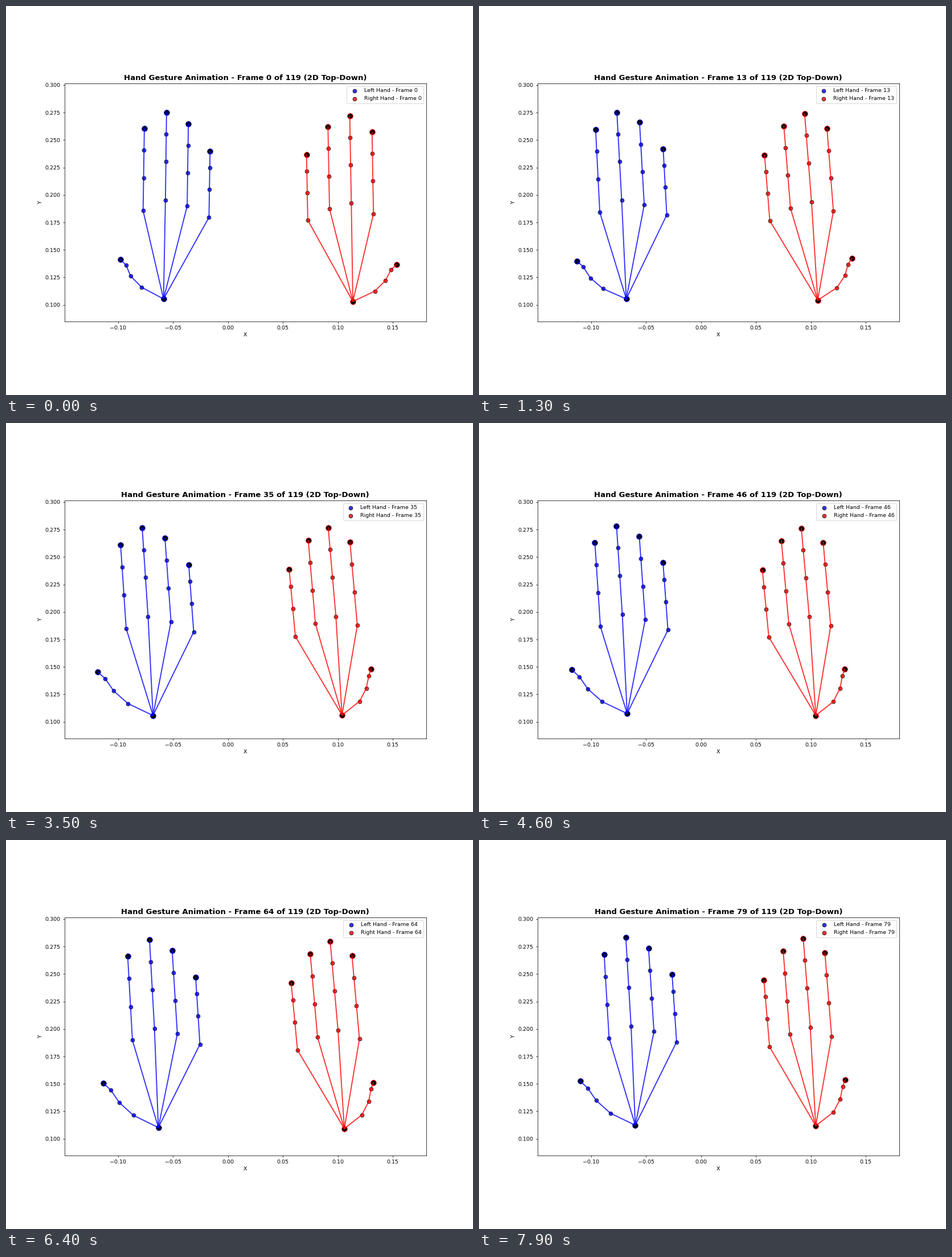
Write a matplotlib script that moves like this. It is 820 px wide and 683 px high and loops after 8000 ms.

```python
import numpy as np
import matplotlib.pyplot as plt
from matplotlib.animation import FuncAnimation

DPI = 68.3
FRAMES, TOTAL = 80, 119
UNIT = 1928.5  # stage pixels per data unit

# Spread of the two middle joints along each finger, index to little finger
JOINTS = ((0.40, 0.735), (0.44, 0.753), (0.40, 0.735), (0.418, 0.749))

# Each pose: wrist, four thumb joints, then knuckle and tip of every finger
LEFT_POSES = [
    [(276.5, 514.5), (238, 494), (218.8, 474.5), (210.6, 455), (200.5, 445),
     (240.6, 359.5), (242.8, 215), (279.8, 341.2), (281.8, 187),
     (318, 351.3), (320.1, 206.7), (356.3, 371.2), (358.2, 255)],
    [(258.5, 514.5), (217.6, 496.6), (195.6, 477.8), (182.6, 457.8), (172.3, 448.4),
     (212, 362.3), (204.6, 216.7), (250.4, 341.2), (242, 186.8),
     (290, 349.2), (281.8, 204.6), (329.6, 367), (323.3, 251)],
    [(255, 515.3), (210.7, 494.9), (185.4, 473), (170.3, 451.8), (156.6, 439.5),
     (206, 363), (194.4, 216.1), (244.2, 341.7), (232, 186.1),
     (284.6, 350), (272.2, 203.9), (324.7, 367.7), (314.5, 249.7)],
]
RIGHT_POSES = [
    [(609, 519), (647.5, 500.9), (665.9, 482.5), (676, 463.4), (685.5, 454.4),
     (645.2, 365), (642.7, 221.6), (606.3, 346.5), (603.5, 192.9),
     (568, 356.1), (565.3, 212.6), (529.8, 376), (527.7, 261.2)],
    [(594.7, 516.7), (628.2, 494.9), (642.5, 473.6), (648, 453.8), (655, 442.9),
     (622.2, 360), (611, 215.4), (583.8, 343.8), (571.7, 189.4),
     (546.9, 355.4), (535.2, 210.8), (510.6, 377.2), (501.3, 261.7)],
    [(587.2, 517), (618, 492.6), (629.6, 469.5), (633.8, 447.5), (637.8, 435.5),
     (613.2, 359.4), (599.6, 213), (575.5, 343.8), (561.2, 188.1),
     (539.6, 356.7), (526.3, 210.7), (504.5, 379.4), (493, 261.9)],
]

# Rigid drift after the last pose: time step, wrist x, wrist y, turn in degrees
LEFT_DRIFT = [(24, 255, 515.3, 0), (35, 258, 513.7, 0.7), (46, 260, 510.3, 0.76),
              (64, 267.4, 505, 1.3), (79, 274.3, 501, 1.12)]
RIGHT_DRIFT = [(24, 587.2, 517, 0), (35, 590, 513, 0.3), (40, 591, 515, 0.2),
               (46, 591.3, 513.7, 0.1), (54, 593, 508.5, 0.15),
               (64, 594, 507, 0.2), (79, 591.2, 502, 0.7)]


def phase(i):
    """Position between the poses: slow start, quick middle, soft stop."""
    return np.interp(i, (0, 5, 9, 13, 18, 20, 24), (0, 0.18, 0.5, 1, 1.81, 1.93, 2))


class Hand:
    def __init__(self, ax, name, color, poses, drift):
        self.name = name
        self.poses = np.array(poses) @ (1, 1j)
        self.drift = np.array(drift).T
        self.dots = ax.scatter([], [], s=50, c=color, alpha=0.8,
                               edgecolors="black", linewidths=1, label=name)
        self.ends = ax.scatter([], [], s=100, c="black", edgecolors=color,
                               linewidths=1)
        self.lines = [ax.plot([], [], color=color, lw=2, alpha=0.8)[0]
                      for _ in range(5)]

    def points(self, i):
        p = phase(i)
        k = min(int(p), 1)
        pts = self.poses[k] + (p - k) * (self.poses[k + 1] - self.poses[k])
        t, x, y, turn = self.drift
        if i > t[0]:
            spin = np.exp(1j * np.radians(np.interp(i, t, turn)))
            wrist = np.interp(i, t, x) + 1j * np.interp(i, t, y)
            pts = wrist + (pts - pts[0]) * spin
        return (pts.real - 389.7) / UNIT + 1j * (0.1 + (524.8 - pts.imag) / UNIT)

    def update(self, i):
        pts = self.points(i)
        wrist = pts[0]
        chains = [list(pts[1:5])]
        for (a, b), knuckle, tip in zip(JOINTS, pts[5::2], pts[6::2]):
            chains.append([knuckle + f * (tip - knuckle) for f in (0, a, b, 1)])
        for line, chain in zip(self.lines, chains):
            path = np.array([wrist] + chain)
            line.set_data(path.real, path.imag)
        place(self.dots, [wrist] + sum(chains, []))
        place(self.ends, [wrist] + [c[-1] for c in chains])


def place(dots, pts):
    pts = np.array(pts)
    dots.set_offsets(np.column_stack((pts.real, pts.imag)))


fig, ax = plt.subplots(figsize=((820 + 1e-6) / DPI, (683 + 1e-6) / DPI), dpi=DPI)
ax.set(xlim=(-0.1490, 0.1806), ylim=(0.0848, 0.3016), xlabel="X", ylabel="Y")
ax.set_aspect("equal")
title = ax.set_title("", fontsize=14, fontweight="bold")
hands = [Hand(ax, "Left Hand", "blue", LEFT_POSES, LEFT_DRIFT),
         Hand(ax, "Right Hand", "red", RIGHT_POSES, RIGHT_DRIFT)]
legend = ax.legend(loc="upper right")


def draw(i):
    title.set_text(f"Hand Gesture Animation - Frame {i} of {TOTAL} (2D Top-Down)")
    for hand, text in zip(hands, legend.get_texts()):
        hand.update(i)
        text.set_text(f"{hand.name} - Frame {i}")
    return []


anim = FuncAnimation(fig, draw, frames=FRAMES, interval=100, repeat=True,
                     repeat_delay=0)
plt.show()
```
